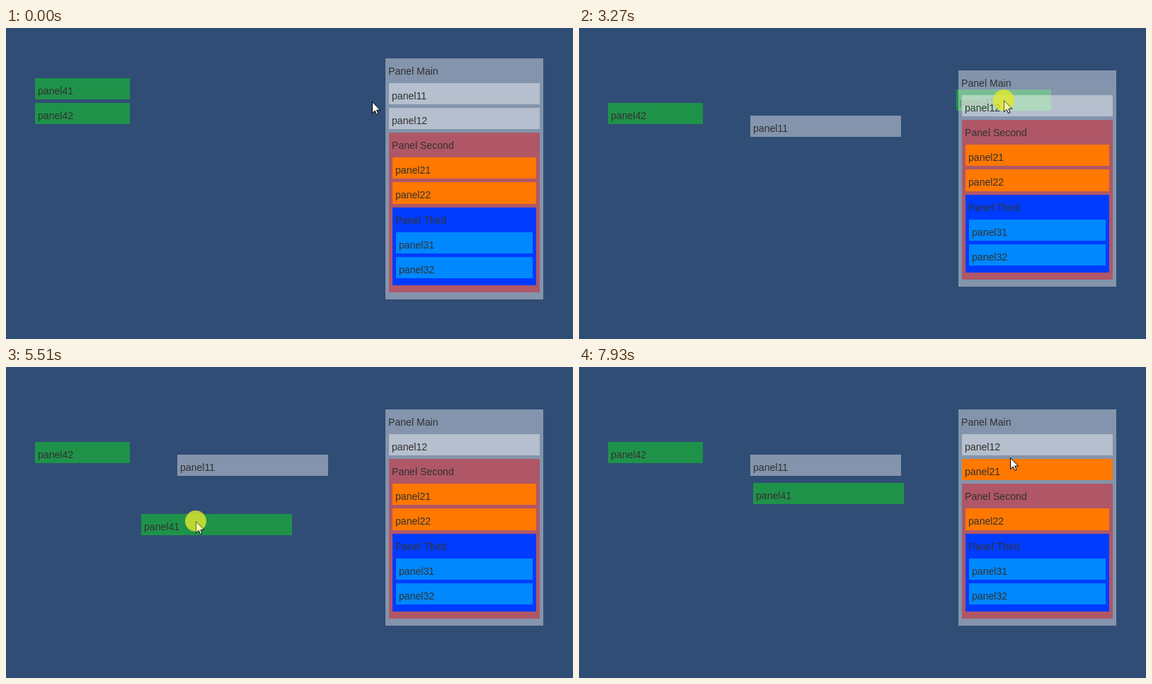
An HTML page with a canvas that plays this animation: 801x440 px, repeating every 8000 ms.

```html
<!DOCTYPE html>
<html lang="en">
<head>
<meta charset="utf-8">
<title>Nested panels drag and drop</title>
<style>
  html, body { margin: 0; width: 100%; height: 100%; overflow: hidden; background: #304d75; }
  canvas { display: block; }
</style>
</head>
<body>
<canvas id="stage" width="801" height="440"></canvas>
<script>
const ctx = document.getElementById('stage').getContext('2d');
const LOOP = 8000, STEP = 78;
const PITCH = 35.16, ROW = 30.2;
const COLORS = {
  back: '#304d75', glass: 'rgba(255,255,255,.4)', green: '#1f924a',
  red: 'rgba(206,48,58,.6)', orange: '#ff7800', blue: '#003cff', sky: '#0088ff',
  text: '#323232', press: 'rgba(226,232,45,.8)'
};

const within = (t, a, b) => t >= a && t < b;

// A pointer move: start time, number of held steps, polyline
const move = (start, count, ...path) => ({ start, count, path });
const rest = move(0, 1, 517, 104);
const approach = [
  rest,
  move(80, 4, 540, 88, 575, 81, 612, 96),
  move(480, 1, 621, 96)
];
const firstDrag = [
  move(690, 12, 619, 96, 563, 89, 465, 98, 385, 123, 341, 138, 318, 141),
  move(1710, 3, 322, 143, 340, 146),
  move(2110, 7, 296, 141, 95, 95, 106, 92)
];
const secondDrag = [
  move(2720, 12, 108, 92, 160, 82, 375, 72, 595, 101, 622, 108, 625, 106),
  move(4350, 1, 617, 106),
  move(4580, 2, 618, 120, 618, 133)
];
const thirdDrag = [
  move(5030, 5, 618, 123, 430, 195, 264, 220),
  move(5510, 5, 268, 218, 298, 194, 322, 173),
  move(6150, 3, 390, 172, 578, 180)
];
const lastDrag = [
  move(6370, 4, 592, 178, 612, 177),
  move(6840, 4, 612, 172, 623, 112),
  move(7230, 3, 622, 108, 609, 128)
];
const MOVES = [approach, firstDrag, secondDrag, thirdDrag, lastDrag].flat();

function pointer(t) {
  const { start, count, path } = MOVES.filter(m => m.start <= t).pop();
  if (count === 1) return path;
  const step = Math.min(count - 1, Math.floor((t - start) / STEP));
  const last = path.length / 2 - 1;
  const u = step / (count - 1) * last;
  const i = Math.min(Math.floor(u), last - 1);
  const mix = k => {
    const a = path[2 * i + k], b = path[2 * i + 2 + k];
    return Math.round(a + (b - a) * (u - i));
  };
  return [mix(0), mix(1)];
}

const pressed = t => within(t, 690, 1710) || within(t, 2720, 3970) ||
  within(t, 4960, 5900) || within(t, 6760, 7560);

function box(label, color, x, y, w, h = ROW) {
  const top = Math.round(y);
  ctx.fillStyle = color;
  ctx.fillRect(x, top, w, Math.round(y + h) - top);
  ctx.fillStyle = COLORS.text;
  ctx.fillText(label, x + 4, top + 23);
}

// Stacked group: a header row, single rows and nested groups
const rowCount = g => 1 + g.items.reduce((n, it) => n + (it.items ? rowCount(it) : 1), 0);
const depth = g => 1 + Math.max(0, ...g.items.map(it => it.items ? depth(it) : 0));

function drawGroup(g, x, y, w) {
  const h = (rowCount(g) - 1) * PITCH + ROW + 10 * depth(g);
  box(g.label, g.color, x, y, w, h);
  let row = 1;
  for (const it of g.items) {
    const top = y + row * PITCH;
    if (it.items) {
      drawGroup(it, x + 5, top, w - 10);
      row += rowCount(it);
    } else {
      box(it.label, it.color, x + 5, top, w - 10);
      row++;
    }
  }
}

const item = (label, color) => ({ label, color });
const group = (label, color, ...items) => ({ label, color, items: items.filter(Boolean) });

function drawMain(t) {
  const { glass, red, orange, blue, sky, green } = COLORS;
  const p21 = item('panel21', orange);
  const third = group('Panel Third', blue, item('panel31', sky), item('panel32', sky));
  const second = group('Panel Second', red, t < 6840 && p21, item('panel22', orange), third);
  const main = group('Panel Main', glass,
    t < 760 && item('panel11', glass),
    item('panel12', glass),
    within(t, 3970, 5030) && item('panel41', green),
    t >= 7560 && p21,
    second);
  drawGroup(main, 536, 42.55 + 17.25 * (9 - rowCount(main)), 223);
}

// Panels outside the main group lie behind it
function drawLoose(t, [x, y]) {
  const { glass, green, orange } = COLORS;
  if (t < 2790) box('panel41', green, 41, 71, 134);
  box('panel42', green, 41, 106, 134);

  if (within(t, 760, 1710)) box('panel11', glass, x - 76, y - 17, 213);
  else if (t >= 1710) box('panel11', glass, 242, 124, 213);

  if (within(t, 2790, 3970)) box('panel41', green, x - 67, y - 15, 134);
  else if (within(t, 5030, 5820)) box('panel41', green, x - 77, y - 10, 213);
  else if (t >= 5820) box('panel41', green, 246, 164, 213);

  if (within(t, 6840, 7560)) box('panel21', orange, x - 66, y - 13, 203);
}

const arrow = new Path2D('M.5 .5V16.5L4.2 13 6.7 18.5 9 17.5 6.6 12.2H11.5Z');

function drawArrow(x, y, alpha) {
  ctx.save();
  ctx.translate(x, y);
  ctx.globalAlpha = alpha;
  ctx.fillStyle = '#fff';
  ctx.strokeStyle = '#000';
  ctx.lineWidth = 1;
  ctx.fill(arrow);
  ctx.stroke(arrow);
  ctx.restore();
}

function drawPointer(t, [x, y]) {
  drawArrow(x, y, 1);
  if (!pressed(t)) return;
  ctx.fillStyle = COLORS.press;
  ctx.beginPath();
  ctx.arc(x, y, 15, 0, Math.PI * 2);
  ctx.fill();
  drawArrow(x, y, .5);
}

function draw(t) {
  const at = pointer(t);
  ctx.font = '14.1px "Liberation Sans", Arial, sans-serif';
  ctx.fillStyle = COLORS.back;
  ctx.fillRect(0, 0, 801, 440);
  drawLoose(t, at);
  drawMain(t);
  drawPointer(t, at);
}

const begin = performance.now();
function tick() {
  draw(Math.max(0, performance.now() - begin) % LOOP);
  requestAnimationFrame(tick);
}
tick();
</script>
</body>
</html>
```
